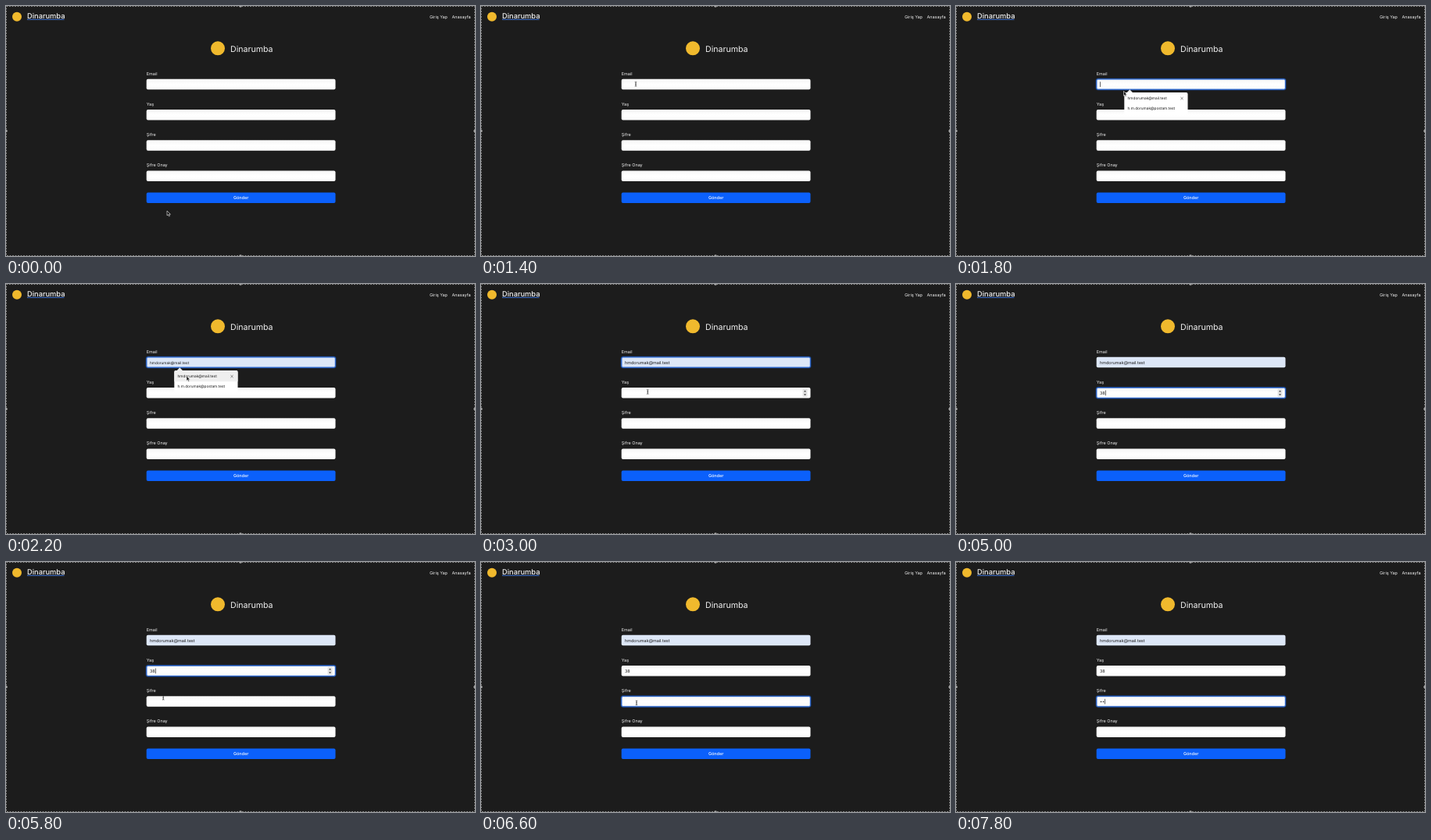
Recreate the animation shown at these times as an HTML page. Size 600x321 px, loop 8000 ms.

```html
<!DOCTYPE html>
<html lang="tr">
<head>
<meta charset="utf-8">
<title>Dinarumba</title>
<style>
  html, body { margin: 0; height: 100%; overflow: hidden; background: #1c1c1c; }
  svg { display: block; width: 100vw; height: 100vh; }
  text { font: 5.45px Inter, "Liberation Sans", sans-serif; fill: #f2f2f2; text-rendering: geometricPrecision; }
  .brand { font-size: 9.3px; font-weight: 500; }
  .title { font-size: 10.6px; }
  .dark { fill: #181818; }
  .small { font-size: 4.75px; }
  .button { font-weight: 500; fill: #fff; }
  .coin { fill: #f0b92d; }
  .frame { fill: none; stroke: #858585; stroke-dasharray: 2 1.5; }
  .handle { fill: #a8a8a8; }
  .glow { fill: none; stroke: #0d5bdc; stroke-opacity: .45; stroke-width: 2; }
  .ring { fill: none; stroke: #2b62c4; stroke-width: 1; }
</style>
</head>
<body>
<svg viewBox="0 0 600 321">
  <defs>
    <linearGradient id="white" x2="0" y2="1">
      <stop offset="0" stop-color="#f5f5f5"/><stop offset=".5" stop-color="#fff"/><stop offset="1" stop-color="#fafafa"/>
    </linearGradient>
  </defs>
  <rect width="600" height="321" fill="#1c1c1c"/>
  <rect class="frame" x=".5" y=".5" width="599" height="320"/>
  <g class="handle">
    <circle cx="300" cy="0" r="1.8"/><circle cx="300" cy="321" r="1.8"/>
    <circle cx="0" cy="160.5" r="1.8"/><circle cx="600" cy="160.5" r="1.8"/>
  </g>

  <circle class="coin" cx="14" cy="13.8" r="6"/>
  <text class="brand" x="27" y="15.8">Dinarumba</text>
  <rect x="27" y="16.8" width="47.5" height="1" fill="#3f74d6"/>
  <text x="542" y="15.8">Giriş Yap</text>
  <text x="570.6" y="15.8">Anasayfa</text>
  <circle class="coin" cx="271" cy="54.3" r="9"/>
  <text class="title" x="287" y="58.6">Dinarumba</text>

  <g id="form"></g>
  <rect x="179.7" y="239.5" width="241.8" height="13.5" rx="2" fill="#0b60fb"/>
  <text class="button" x="300.6" y="248.2" text-anchor="middle">Gönder</text>

  <g id="spinner">
    <rect x="411.5" y="134.8" width="6" height="10" rx="1" fill="#e4e4e4"/>
    <path d="M413 138.6l1.5-2 1.5 2zM413 141.2l1.5 2 1.5-2z" fill="#444"/>
  </g>
  <rect id="caret" width=".7" height="6.6" fill="#222"/>

  <g id="menu">
    <path d="M218.5 111.3l3.8-4 3.8 4z" fill="#efefef"/>
    <rect x="215.3" y="111" width="81.2" height="28.3" rx="2" fill="#fff"/>
    <path id="hover" d="M215.3 125.3v-12.3a2 2 0 0 1 2-2h77.2a2 2 0 0 1 2 2v12.3z" fill="#efefef"/>
    <text class="dark small" x="219.5" y="120.4">hmdorumak@mail.test</text>
    <text class="dark small" x="219.5" y="133.3">h.m.dorumak@postam.test</text>
    <path d="M287.4 117l3.2 3.2m0-3.2l-3.2 3.2" stroke="#444" stroke-width=".6"/>
  </g>

  <path id="arrow" d="M0 0v6l1.4-1.2 1 2.2 1.1-.5-1-2.1h1.9z" fill="#111" stroke="#eee" stroke-width=".6"/>
  <path id="beam" d="M-1.2-2.8q1.2 0 1.2.8v4q0 .8-1.2.8M1.2-2.8q-1.2 0-1.2.8M0 2q0 .8 1.2.8M-.8 0h1.6" fill="none" stroke="#222" stroke-width=".7"/>
</svg>
<script>
const LOOP = 8000, STEP = 200;
const $ = id => document.getElementById(id);
const show = (el, on) => el.setAttribute("visibility", on ? "visible" : "hidden");

const fieldTop = i => 93.8 + i * 39.27;
const box = (i, attrs) =>
  `<rect x="179.7" y="${fieldTop(i)}" width="241.8" height="13.5" rx="2" ${attrs}/>`;

$("form").innerHTML = ["Email", "Yaş", "Şifre", "Şifre Onay"].map((label, i) => `
  <text x="179.8" y="${fieldTop(i) - 5.2}">${label}</text>
  ${box(i, `id="box${i}" fill="url(#white)"`)}
  <g id="focus${i}">${box(i, 'class="glow"')}${box(i, 'class="ring"')}</g>
  <text id="value${i}" class="dark" x="184" y="${fieldTop(i) + 8.8}"></text>`).join("");

// Pointer path: time, x, y
const path = [
  [0, 206, 263], [1200, 198, 100.3], [1600, 198, 100.3], [2000, 231, 118.3],
  [2400, 231, 118.3], [3000, 213.3, 138.5], [5200, 213.3, 138.5], [6000, 199, 180.8], [LOOP, 199, 180.8]
];
// Start of focus or key press: time, field
const actions = [[1600, 0], [2400, 0], [3200, 1], [4200, 1], [4600, 1], [6000, 2], [7400, 2], [7800, 2]];

function pointerAt(t) {
  const n = path.findIndex(p => p[0] > t);
  const [t0, x0, y0] = path[n - 1], [t1, x1, y1] = path[n];
  const u = (t - t0) / (t1 - t0), e = u * u * (3 - 2 * u);
  return [x0 + (x1 - x0) * e, y0 + (y1 - y0) * e];
}

function draw(t) {
  const [x, y] = pointerAt(t);
  const [since, active] = actions.filter(a => a[0] <= t).pop() || [0, -1];
  const preview = t >= 2000 && t < 2400;
  const values = [
    t >= 2000 ? "hmdorumak@mail.test" : "",
    t >= 4600 ? "38" : t >= 4200 ? "3" : "",
    t >= 7800 ? "••" : t >= 7400 ? "•" : "",
    ""
  ];
  values.forEach((value, i) => {
    $("value" + i).textContent = value;
    show($("focus" + i), i === active);
  });
  $("value0").classList.toggle("small", preview);
  $("box0").setAttribute("fill", t >= 2000 ? "#dde7f7" : "url(#white)");
  show($("menu"), t >= 1800 && t < 2400);
  show($("hover"), preview);

  const visible = t < 3800 || (t >= 5400 && t < 7000);
  const over = [0, 1, 2, 3].findIndex(i => y > fieldTop(i) && y < fieldTop(i) + 13.5);
  for (const [id, on] of [["arrow", over < 0], ["beam", over >= 0]]) {
    $(id).setAttribute("transform", `translate(${x} ${y})`);
    show($(id), visible && on);
  }
  show($("spinner"), active === 1 || (visible && over === 1));

  const blink = active >= 0 && !preview && (t - since) % 1000 < 500;
  show($("caret"), blink);
  if (blink) {
    const width = values[active] ? $("value" + active).getComputedTextLength() : 0;
    $("caret").setAttribute("x", 184.2 + width);
    $("caret").setAttribute("y", fieldTop(active) + 3.5);
  }
}

function tick(now) {
  draw(Math.floor(now % LOOP / STEP) * STEP);
  requestAnimationFrame(tick);
}
draw(0);
requestAnimationFrame(tick);
</script>
</body>
</html>
```
